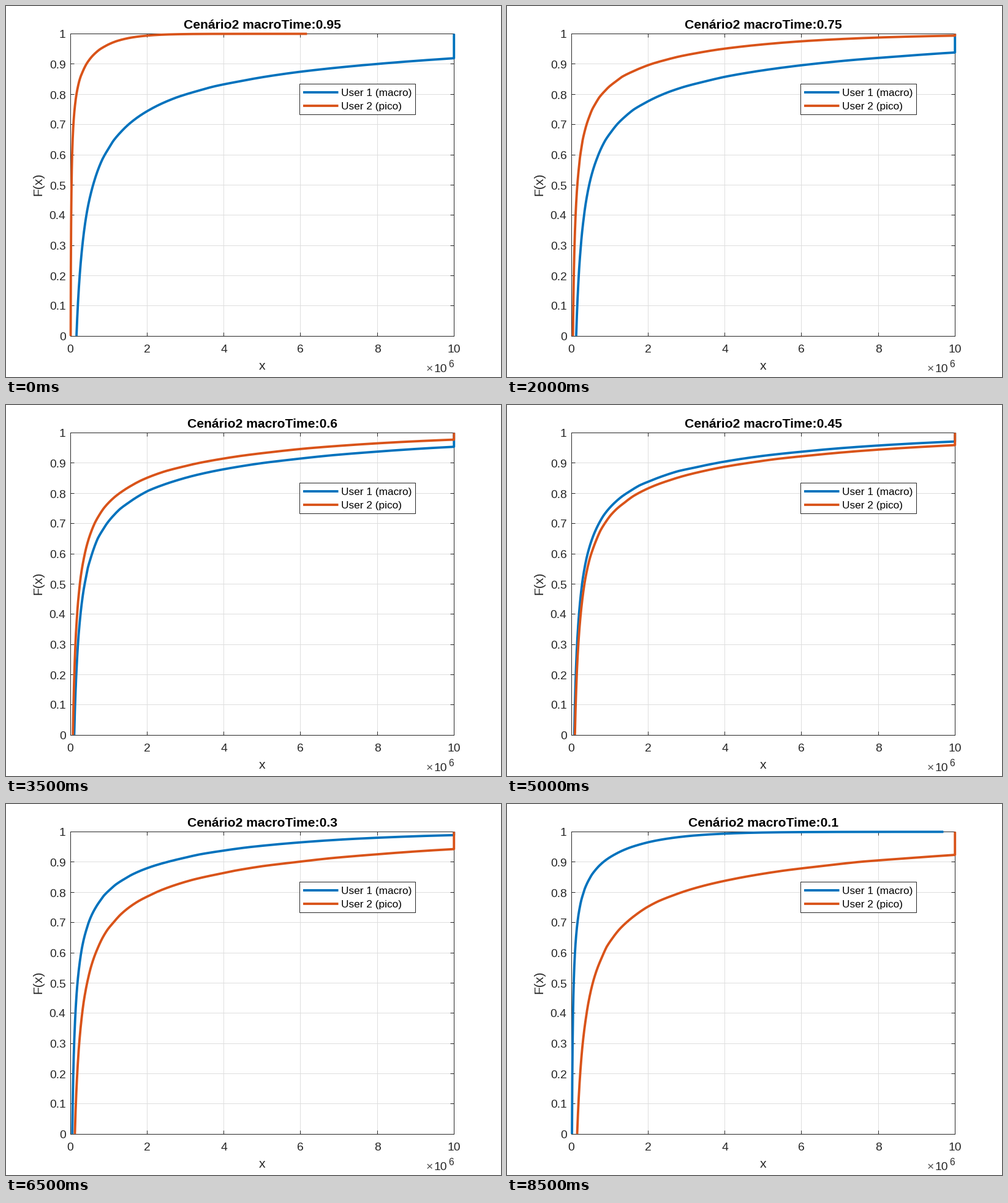
Animation, 808 px wide and 606 px high, one loop 9 s. Source, as a matplotlib script:

```python
import numpy as np
import matplotlib.pyplot as plt
from matplotlib.animation import FuncAnimation
from matplotlib.patches import Rectangle

W, H, DPI = 808, 606, 100
LEFT, RIGHT = .13 * W, .905 * W
TOP, BOTTOM = .075 * H, .89 * H
BLUE, ORANGE, INK, GRID = "#0072BD", "#D95319", "#262626", "#DEDEDE"
FRAMES, INTERVAL = 18, 500
X_CAP = 10.0
MIN_RATE = .168
TICK, NAME, KEY = 19.25, 21.2, 17.2
TICK_LEN, CURVE_WIDTH = 6, 3.85

plt.rcParams["font.family"] = "Liberation Sans"


def cdf(rate):
    """Power law with an exponential cut-off, for a full time share."""
    tail = (rate / MIN_RATE) ** -.525 * np.exp(-(rate / 22.4) ** 1.4)
    return 1 - tail


def px(x):
    return LEFT + (RIGHT - LEFT) * x / X_CAP


def py(f):
    return BOTTOM - (BOTTOM - TOP) * f


def crisp(v):
    """Centre of the pixel that holds v."""
    return np.floor(v) + .5


def curve(share, max_rate, seed):
    """Pixel path of one user's empirical distribution."""
    top = min(X_CAP / share, max_rate)
    rate = np.geomspace(MIN_RATE, top, 400)
    f = cdf(rate)
    rng = np.random.default_rng(seed)
    nodes = np.geomspace(MIN_RATE, 125, 45)
    jitter = np.interp(rate, nodes, rng.normal(0, .001, len(nodes)))
    f = np.clip(f + jitter * 4 * f * (1 - f), 0, 1)
    return px(np.append(rate, top) * share), py(np.append(f, 1))


fig = plt.figure(figsize=(W / DPI, H / DPI), dpi=DPI, facecolor="white")
ax = fig.add_axes([0, 0, 1, 1])
ax.set_xlim(0, W)
ax.set_ylim(H, 0)
ax.axis("off")


def pt(pixels):
    return pixels * 72 / DPI


def label(x, y, text, size, ha="center", color=INK, **kw):
    return ax.text(x, y, text, fontsize=pt(size), ha=ha, va="baseline",
                   color=color, zorder=6, **kw)


def rule(xs, ys, color, width=1, z=1):
    return ax.plot(xs, ys, color=color, lw=pt(width), zorder=z, snap=False,
                   solid_capstyle="butt", solid_joinstyle="round")[0]


def box(x0, y0, x1, y1, fill, z):
    ax.add_patch(Rectangle((x0, y0), x1 - x0, y1 - y0, fc=fill, ec=INK,
                           lw=pt(1), zorder=z, snap=False))


x0, x1, y0, y1 = map(crisp, (LEFT, RIGHT, TOP, BOTTOM))

for v in range(0, 11, 2):
    x = crisp(px(v))
    if 0 < v < 10:
        rule([x, x], [y0, y1], GRID)
    rule([x, x], [y1, y1 - TICK_LEN], INK, z=2)
    rule([x, x], [y0, y0 + TICK_LEN], INK, z=2)
    label(px(v), 566.5, str(v), TICK)

for k in range(11):
    y = crisp(py(k / 10))
    if 0 < k < 10:
        rule([x0, x1], [y, y], GRID)
    rule([x0, x0 + TICK_LEN], [y, y], INK, z=2)
    rule([x1, x1 - TICK_LEN], [y, y], INK, z=2)
    label(97.6, y + 7, f"{k / 10:g}", TICK, ha="right")

box(x0, y0, x1, y1, "none", 2)

label(418.2, 594.5, "x", NAME)
label(58, 291.5, "F(x)", NAME, rotation=90, rotation_mode="anchor")
label(685.5, 598.5, "×", TICK, ha="left", color="#505050")
label(698.5, 598.5, "10", TICK, ha="left")
label(722, 589.5, "6", 15.5, ha="left")
title = label(418.2, 37, "", NAME, color="black", weight="bold")

box(479.5, 127.5, 668.5, 177.5, "white", 4)
for y, color, text in ((141, BLUE, "User 1 (macro)"),
                       (163, ORANGE, "User 2 (pico)")):
    rule([485, 542.5], [y, y], color, CURVE_WIDTH, z=5)
    label(547, y + 6.5, text, KEY, ha="left", color="black")

macro = rule([], [], BLUE, CURVE_WIDTH, z=3)
pico = rule([], [], ORANGE, CURVE_WIDTH, z=3.1)


def draw(i):
    share = round(.95 - .05 * i, 2)
    title.set_text(f"Cenário2 macroTime:{share:g}")
    macro.set_data(*curve(share, 97, 2 * i))
    pico.set_data(*curve(1 - share, 123.4, 2 * i + 1))
    return title, macro, pico


anim = FuncAnimation(fig, draw, frames=FRAMES, interval=INTERVAL,
                     repeat=True, repeat_delay=0)
plt.show()
```
